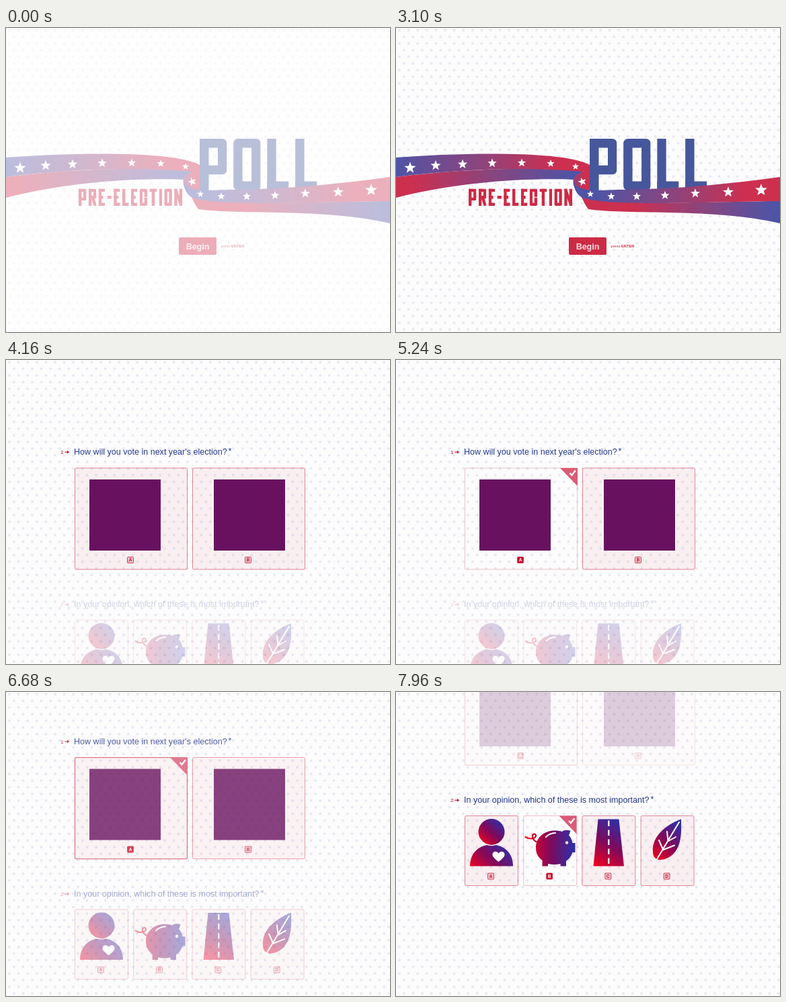
Recreate the animation shown at these times as an HTML page with a canvas. Size 571 px wide and 453 px high, loop 8000 ms.

```html
<!DOCTYPE html>
<html lang="en">
<head>
<meta charset="utf-8">
<title>Pre-election poll</title>
<style>
html, body { margin: 0; width: 100%; height: 100%; overflow: hidden; background: #fcfcfc; }
canvas { display: block; width: 571px; height: 453px; }
</style>
</head>
<body>
<canvas id="stage" width="571" height="453" role="img" aria-label="Pre-election poll"></canvas>
<script>
const W = 571, H = 453, LOOP = 8000, SCROLL = 203;
const RED = '#c8102e', INK = '#24388c', SANS = '"Liberation Sans", Arial, sans-serif';
const screen = document.getElementById('stage').getContext('2d');
const makeLayer = () => {
  const c = document.createElement('canvas');
  c.width = W; c.height = H;
  return c.getContext('2d');
};
const buffer = makeLayer();
let g = screen;

const clamp = v => Math.max(0, Math.min(1, v));
const ramp = (t, a, b) => clamp((t - a) / (b - a));
const easeOut = p => 1 - (1 - p) ** 2;
const mix = (a, b, p) => a + (b - a) * p;
const red = a => `rgba(200,16,46,${a})`;

// Draw a group and place it as one translucent picture
function group(alpha, dy, draw) {
  if (alpha <= 0) return;
  g = buffer;
  g.clearRect(0, 0, W, H);
  g.save();
  g.translate(0, dy);
  draw();
  g.restore();
  g = screen;
  g.globalAlpha = alpha;
  g.drawImage(buffer.canvas, 0, 0);
  g.globalAlpha = 1;
}

function gradient(x0, y0, x1, y1, ...colors) {
  const f = g.createLinearGradient(x0, y0, x1, y1);
  colors.forEach((c, i) => f.addColorStop(i / (colors.length - 1), c));
  return f;
}

function fill(d, color) {
  g.fillStyle = color;
  g.fill(new Path2D(d));
}

function line(d, color, width) {
  g.strokeStyle = color;
  g.lineWidth = width;
  g.stroke(new Path2D(d));
}

function star(x, y, r, turn = 0) {
  g.beginPath();
  for (let i = 0; i < 10; i++) {
    const a = turn + i * Math.PI / 5 - Math.PI / 2, q = i % 2 ? r * 0.42 : r;
    g.lineTo(x + q * Math.cos(a), y + q * Math.sin(a));
  }
  g.fill();
}

function text(s, x, y, font, color, align = 'left') {
  g.font = font + ' ' + SANS;
  g.fillStyle = color;
  g.textAlign = align;
  g.fillText(s, x, y);
}

function drawBackdrop() {
  g.fillStyle = '#fcfcfc';
  g.fillRect(0, 0, W, H);
  g.fillStyle = '#e6e6f2';
  for (let row = 0; row < 47; row++)
    for (let col = -1; col < 43; col++)
      star(5 + col * 13.59 + (row % 2) * 6.8, 3.2 + row * 9.91, 3);
}
const backdrop = makeLayer();
g = backdrop;
drawBackdrop();
g = screen;

// Block letters: strokes on a grid 2 wide and 8 high
const GLYPHS = {
  P: '08 00,00 20 25 05', R: '08 00,00 20 24 04,14 28', E: '00 08,00 20,04 14,08 28',
  L: '00 08,08 28', C: '23 20 00 08 28 25', T: '00 20,10 18', I: '00 08',
  O: '00 20 28 08 00', N: '08 00,00 28,28 20', '-': '04 24'
};

function glyph(ch, x, y, w, h, s) {
  g.save();
  g.beginPath();
  g.rect(x, y, w, h);
  g.clip();
  g.lineWidth = s;
  g.lineCap = 'square';
  g.lineJoin = 'round';
  for (const path of GLYPHS[ch].split(',')) {
    const pts = path.split(' ');
    g.beginPath();
    for (const [a, b] of pts) g.lineTo(x + s / 2 + a / 2 * (w - s), y + s / 2 + b / 8 * (h - s));
    if (pts.length > 2 && pts[0] === pts[pts.length - 1]) g.closePath();
    g.stroke();
  }
  g.restore();
}

function lettering(word, x, y, h, s, gap, widths) {
  for (const ch of word) {
    const w = widths[ch] || widths.all;
    glyph(ch, x, y, w, h, s);
    x += w + gap;
  }
}

const RIBBON_STARS = [
  [21, 208.5, 9], [59, 205, 8], [99, 203, 7.5], [143, 201.5, 7], [187, 201, 6.5], [230, 202, 6],
  [267, 206.5, 5.3], [277, 229, 6.5], [289, 247.5, 5.3], [320, 251, 6], [358, 251, 6.5],
  [400, 249.5, 6.8], [445, 246.5, 7.3], [494, 244.5, 8.4], [543, 241.5, 9.4]
];

function drawRibbon() {
  const crimson = '#c8163a', blue = '#3a3f9b', plum = '#7c2e6e';
  fill('M0 222C90 211 190 206 280 213L276 217C268 219 265 222 264 226C190 223 90 230 0 253Z',
    gradient(20, 0, 260, 0, crimson, plum, blue));
  fill('M0 193C90 186 250 182 288 204L288 211C286 214 282 214 277 214C190 206 90 211 0 222Z',
    gradient(0, 0, 240, 0, blue, plum, crimson));
  fill('M288 206C287 213 276 214 268 219C261 225 263 234 268 243L288 246Z',
    gradient(263, 0, 280, 0, plum, crimson));
  fill('M274 248C300 268 480 258 571 258L571 291C470 268 350 279 286 270C280 262 278 256 274 248Z',
    gradient(350, 0, 560, 0, crimson, plum, blue));
  fill('M264 228C268 245 300 242 330 241C420 240 490 233 571 222L571 258C480 258 300 268 274 251C268 246 264 238 264 228Z',
    gradient(300, 0, 520, 0, blue, plum, crimson));
  g.fillStyle = '#fff';
  for (const [x, y, r] of RIBBON_STARS) star(x, y, r, x === 277 ? -0.3 : 0);
}

function drawTitle() {
  g.strokeStyle = '#30438f';
  lettering('POLL', 288, 165, 77, 13.5, 9.6, { all: 40.5, L: 32.3 });
  drawRibbon();
  g.strokeStyle = RED;
  lettering('PRE-ELECTION', 108, 239.5, 25.5, 4.4, 3.3,
    { all: 11.5, E: 9.5, L: 9.5, '-': 6.5, T: 11, I: 4.4, N: 12 });
  g.fillStyle = RED;
  g.beginPath();
  g.roundRect(257, 312, 56, 26, 2);
  g.fill();
  text('Begin', 285, 329.5, 'bold 12.5px', '#f9dfe4', 'center');
  text('press ', 319.5, 326.5, '5.7px', RED);
  text('ENTER', 335, 326.5, 'bold 5.7px', RED);
}

function heading(num, label, y, end) {
  text(num, 81, y - 1, '8px', RED);
  line(`M87.5 ${y - 3.7}h4`, RED, 1.2);
  fill(`M91 ${y - 6.2}l3.2 2.5l-3.2 2.5z`, RED);
  text(label, 101, y, '12.55px', INK);
  text('*', end, y - 1, '12.5px', INK);
}

// pick: null when free, otherwise { glow, check } in 0..1
function card(x, y, w, h, key, pick) {
  const glow = pick ? pick.glow : 1;
  g.beginPath();
  g.roundRect(x + .5, y + .5, w - 1, h - 1, 2);
  g.fillStyle = red(0.05 * glow);
  g.fill();
  g.strokeStyle = red(pick ? mix(0.25, 0.68, glow) : 0.48);
  g.lineWidth = pick ? mix(1, 1.3, glow) : 1;
  g.stroke();

  const kx = x + w / 2 - 1, ky = y + h - 14.5;
  g.beginPath();
  g.roundRect(kx - 4.5, ky - 4.5, 9, 9, 1);
  g.fillStyle = pick ? RED : red(0.2);
  g.fill();
  g.strokeStyle = red(0.75);
  g.lineWidth = 1;
  g.stroke();
  text(key, kx, ky + 2.4, 'bold 6.5px', pick ? '#fff' : RED, 'center');
}

function corner(right, y, amount) {
  g.globalAlpha = amount;
  fill(`M${right - 26} ${y}h26v27z`, '#dc5a75');
  line(`M${right - 11.5} ${y + 7.5}l2.8 3.2l5.5 -7`, '#fff', 2.3);
  g.globalAlpha = 1;
}

function drawFirst(pick) {
  heading('1', "How will you vote in next year's election?", 141, 330.5);
  card(102, 160.5, 168, 152, 'A', pick);
  card(277, 160.5, 168, 152, 'B', null);
  g.fillStyle = '#68125f';
  g.fillRect(124, 178, 106, 106);
  g.fillRect(309, 178, 106, 106);
  if (pick) corner(270, 161, pick.check);
}

const HOT = '#f00020', COOL = '#2f2fa8', MID = '#7d0a5c';

function person() {
  fill('M122.5 208.5a19.5 19.5 0 1 0 39 0a19.5 19.5 0 1 0 -39 0z',
    gradient(126, 224, 156, 192, HOT, MID, COOL));
  fill('M110 259.5C110 240 123 227.5 142 227.5S174 240 174 259.5Z',
    gradient(116, 266, 160, 222, HOT, MID, COOL));
  g.lineWidth = 1.2;
  g.strokeStyle = '#fbf3f5';
  g.beginPath();
  g.arc(142, 208.5, 20, 0.5, Math.PI - 0.5);
  g.stroke();
  fill('M152.5 253C147 248.5 143.5 246 143.5 242C143.5 237 150 236 152.5 240.5C155 236 161.5 237 161.5 242C161.5 246 158 248.5 152.5 253Z', '#fff');
}

function pig() {
  const f = gradient(196, 0, 264, 0, HOT, MID, COOL);
  g.lineCap = 'round';
  line('M192.5 216C198 220 207 219 208 214.5C208 210 202 211 203 216C204 221 207 223 211 224', f, 2.2);
  g.lineCap = 'butt';
  fill('M208 232C208 217 220 206.5 236 206.5C241 206.5 244 207 247 208C250 205.5 255 205 259.5 207L257 213.5C260 217 261.5 220 262.5 225H266.5V239H262.5C260 246 257 249 253 252V259.5H244.5V256C239 257.5 232 257.5 226 256V259.5H217.5V251C211 246 208 240 208 232Z', f);
  g.lineCap = 'round';
  line('M223 216Q228 210.5 237 210', '#fff', 2);
  g.lineCap = 'butt';
  g.beginPath();
  g.arc(254, 224.5, 2.2, 0, 7);
  g.fillStyle = '#fff';
  g.fill();
}

function road() {
  fill('M300.5 189.5H331.5L339 259.5H293.5Z', gradient(296, 258, 334, 194, HOT, MID, COOL));
  g.fillStyle = '#fff';
  for (let i = 0; i < 5; i++) g.fillRect(315.2, 191.5 + i * 14, 2.2, 8.5);
}

function leaf() {
  fill('M424 189.5C397 199 380 219 382 238C382 245 385 249 391 250C405 251 418 240 422 223C425 211 424 200 424 189.5Z',
    gradient(384, 246, 424, 200, HOT, MID, COOL));
  g.lineCap = 'round';
  line('M421 194L388 249M404.5 221.5L403 208M403.5 223L416 216M397 234.5L391 221M396.5 235.5L414 228.5', '#fff', 2);
  g.lineCap = 'butt';
}

function drawSecond(pick) {
  heading('2', 'In your opinion, which of these is most important?', 165, 378.5);
  [...'ABCD'].forEach((key, i) => card(102 + i * 87.2, 184, 80, 105, key, i === 1 ? pick : null));
  person();
  pig();
  road();
  leaf();
  if (pick) corner(268.5, 184.5, pick.check);
}

function picked(t, start) {
  if (t < start) return null;
  const age = t - start + 6;
  return {
    glow: age > 520 ? 1 : 0.5 + 0.5 * Math.cos(age / 173.3 * 2 * Math.PI),
    check: ramp(age, -40, 80)
  };
}

function render(t) {
  g.drawImage(backdrop.canvas, 0, 0);
  if (t < 3340) {
    group(t < 3100 ? 1 : 1 - ramp(t, 3070, 3340), 0, drawTitle);
    const veil = Math.max(0, 0.66 - 0.33 * Math.floor(t / 50));
    if (veil > 0) {
      g.fillStyle = `rgba(255,255,255,${veil})`;
      g.fillRect(0, 0, W, H);
    }
    return;
  }
  if (t < 3840) return;
  const enter = easeOut(ramp(t, 3800, 4160));
  const move = ramp(t, 6640, 6880);
  const swap = clamp(move * 1.5);
  const dy = 40 * (1 - enter) - SCROLL * easeOut(move);
  group(enter * mix(1, 0.2, swap), dy, () => drawFirst(picked(t, 5160)));
  group(enter * mix(0.2, 1, swap), dy + SCROLL, () => drawSecond(picked(t, 7880)));
}

const began = performance.now();
function tick() {
  render((performance.now() - began) % LOOP);
  requestAnimationFrame(tick);
}
tick();
</script>
</body>
</html>
```
